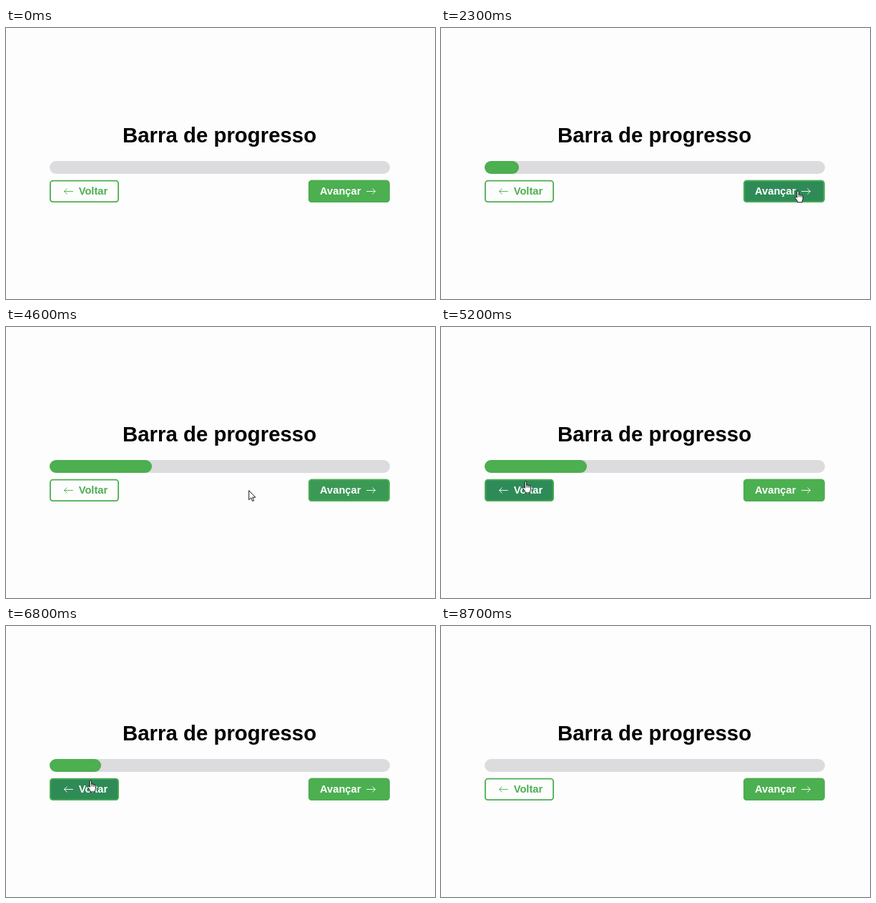
Write an HTML page that moves like this. It is 600 px wide and 379 px high and loops after 9500 ms.

```html
<!DOCTYPE html>
<html lang="pt">
<head>
<meta charset="utf-8">
<title>Barra de progresso</title>
<style>
  html, body { margin: 0; width: 100%; height: 100%; overflow: hidden; background: #fefdfe; }
  svg { position: absolute; left: 0; top: 0; }
  text { font: bold 14.7px "Liberation Sans", Arial, sans-serif; }
  .title { font-size: 29.4px; text-anchor: middle; }
  .arrow { fill: none; stroke: currentColor; stroke-linecap: round; stroke-linejoin: round; }
  .label { fill: currentColor; }
  .box { fill: #2e8b57; fill-opacity: 0; stroke: #4caf50; stroke-width: 1.84; }
  #next { color: #fff; }
  #bar { position: absolute; left: 61px; top: 186px; width: 475.6px; height: 18px; border-radius: 9px; background: #dcdbdd; }
  #fill { width: 0; height: 100%; border-radius: 9px; background: #4caf50; }
  #cursor path { fill: #fff; stroke: #000; stroke-width: .9; stroke-linejoin: round; }
  #cursor .lines { fill: none; stroke-width: .7; }
</style>
</head>
<body>
<svg width="600" height="379" viewBox="0 0 600 379">
  <text class="title" x="298.6" y="159.8">Barra de progresso</text>
  <g id="back">
    <rect class="box" x="61.9" y="213.7" width="95.2" height="29.5" rx="3.7"/>
    <path class="arrow" transform="translate(80.1 221.1) scale(.92)" d="M14.5 8H1.5M5.5 4l-4 4 4 4"/>
    <text class="label" x="101.7" y="233.3">Voltar</text>
  </g>
  <g id="next">
    <rect x="423" y="212.8" width="113.6" height="31.3" rx="4.6" fill="#4caf50"/>
    <rect class="box" x="423.9" y="213.7" width="111.8" height="29.5" rx="3.7"/>
    <text class="label" x="439" y="233.3">Avançar</text>
    <path class="arrow" transform="translate(503.1 221.1) scale(.92)" d="M1.5 8H14.5M10.5 4l4 4-4 4"/>
  </g>
</svg>
<div id="bar"><div id="fill"></div></div>
<svg width="600" height="379" viewBox="0 0 600 379">
  <g id="cursor">
    <g id="hand">
      <path d="M-1.3 .6C-1.3-.6 1.1-.6 1.1 .6V5C1.5 4.3 3.1 4.5 3.2 5.5C3.7 4.9 5.1 5.1 5.2 6.1C5.8 5.6 7 6 7 7V10.6C7 12 6 13 6 14V15.6H-.8V14.3C-1.2 12.6-3.2 10.6-4 9C-4.4 7.8-3.2 7.2-2.2 8.1L-1.3 9.1Z"/>
      <path class="lines" d="M1.1 5V8.2M3.2 5.6V8.4M5.2 6.2V8.6"/>
    </g>
    <path id="pointer" d="M0 0V13L3 10.2L5 14.8L7 14L5 9.5H9.2Z"/>
  </g>
</svg>
<script>
const LOOP = 9500, STEP = 100;
const $ = id => document.getElementById(id);

// Each entry: [start time, new value]
const progress = [[1230, 10], [2610, 20], [3440, 30], [5290, 20], [6310, 10], [7365, 0]];
const backHover = [[50, 1], [250, 0], [4780, 1], [8280, 0]];
const nextHover = [[480, 1], [4500, 0]];

// Each entry: [time, x, y]
const path = [
  [100, 112, 236], [200, 170, 239], [400, 380, 240], [600, 490, 231], [700, 499.2, 228.2],
  [4400, 499.2, 228.2], [4700, 260, 229], [4900, 118.5, 216.3], [8300, 118.5, 216.3]
];

function bezier(x1, y1, x2, y2) {
  const at = (a, b, u) => 3 * a * u * (1 - u) ** 2 + 3 * b * u * u * (1 - u) + u ** 3;
  return x => {
    if (x <= 0) return 0;
    if (x >= 1) return 1;
    let lo = 0, hi = 1;
    for (let i = 0; i < 24; i++) {
      const mid = (lo + hi) / 2;
      if (at(x1, x2, mid) < x) lo = mid; else hi = mid;
    }
    return at(y1, y2, lo);
  };
}
const easeInOut = bezier(.42, 0, .58, 1);
const ease = bezier(.25, .1, .25, 1);

// A new change starts from wherever the running one has got to.
function transition(changes, duration, curve, t) {
  let start = 0, from = 0, to = 0;
  const value = now => from + (to - from) * curve((now - start) / duration);
  for (const [time, target] of changes) {
    if (t < time) break;
    from = value(time);
    to = target;
    start = time;
  }
  return value(t);
}

function position(t) {
  const i = Math.max(1, path.findIndex(p => p[0] >= t));
  const [t0, x0, y0] = path[i - 1], [t1, x1, y1] = path[i];
  const k = (t - t0) / (t1 - t0);
  return [x0 + (x1 - x0) * k, y0 + (y1 - y0) * k];
}

function show(id, visible) {
  $(id).style.display = visible ? "" : "none";
}

function render(t) {
  $("fill").style.width = transition(progress, 1000, easeInOut, t) + "%";

  const back = transition(backHover, 400, ease, t);
  $("back").style.color = `color-mix(in srgb, #fff ${back * 100}%, #4caf50)`;
  $("back").querySelector(".box").style.fillOpacity = back;
  $("next").querySelector(".box").style.fillOpacity = transition(nextHover, 400, ease, t);

  const visible = t >= 100 && t < 8300;
  show("cursor", visible);
  if (!visible) return;
  const [x, y] = position(t);
  const over = x < 158 || x > 423;
  $("cursor").setAttribute("transform", `translate(${x} ${y})`);
  show("hand", over);
  show("pointer", !over);
}

const begin = performance.now();
function tick() {
  const t = (performance.now() - begin) % LOOP;
  render(Math.floor(t / STEP) * STEP);
  requestAnimationFrame(tick);
}
tick();
</script>
</body>
</html>
```
